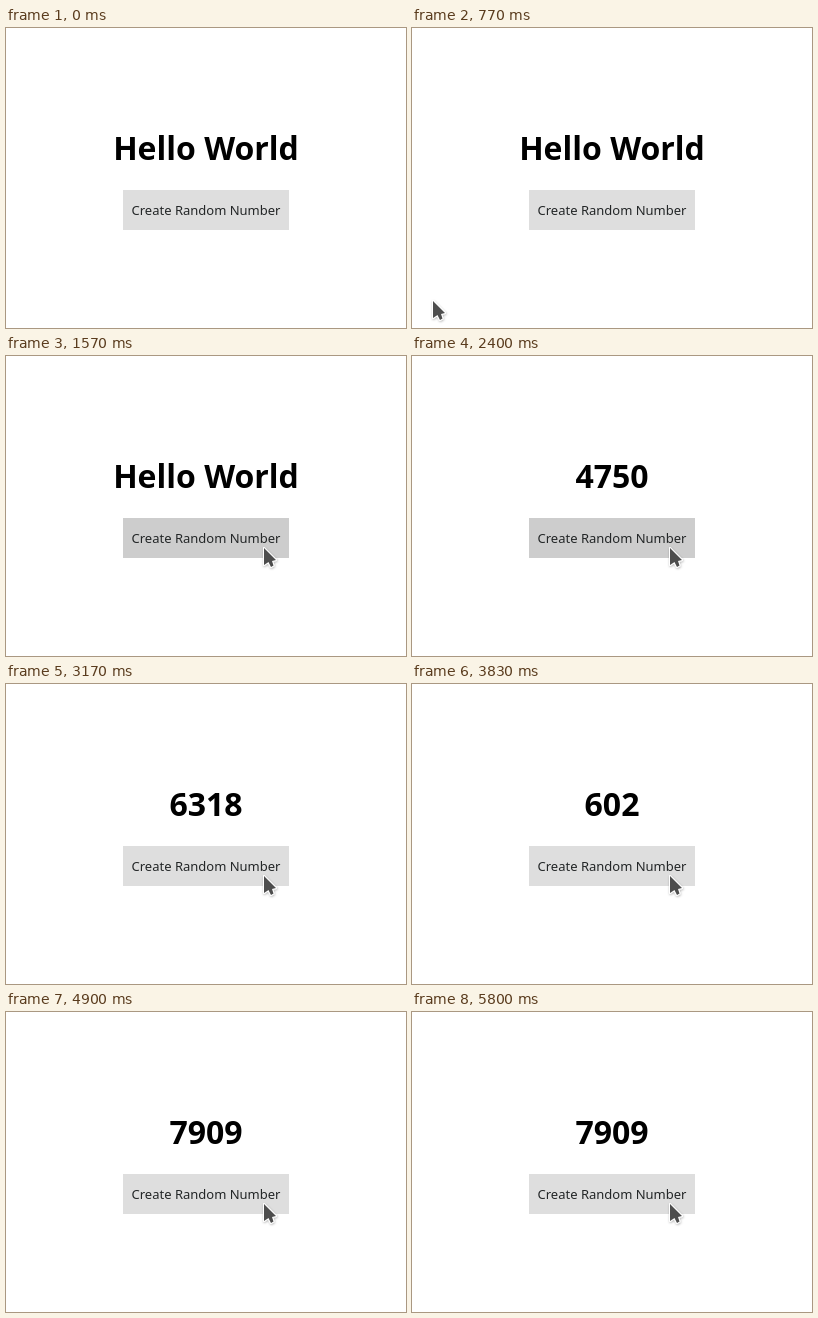
Write an HTML page that moves like this. It is 400 by 300 pixels and loops after 5930 ms.

```html
<!DOCTYPE html>
<html lang="en">
<head>
<meta charset="utf-8">
<title>Random number</title>
<style>
  html, body { margin: 0; width: 100%; height: 100%; overflow: hidden; background: #fff; }
  #stage { position: relative; width: 400px; height: 300px; overflow: hidden; font-family: "Noto Sans", "Open Sans", sans-serif; }
  #title, #button { position: absolute; text-align: center; white-space: nowrap; cursor: default; }
  #title { left: 0; top: 98px; width: 400px; font-size: 32px; font-weight: 700; line-height: 43px; color: #000; }
  #button { left: 117px; top: 162px; width: 166px; height: 29px; padding-top: 11px; font-size: 13px; line-height: 18px; color: #232627; }
  svg { position: absolute; left: 0; top: 0; }
</style>
</head>
<body>
<div id="stage">
  <div id="title">Hello World</div>
  <div id="button">Create Random Number</div>
  <svg width="400" height="300" viewBox="0 0 400 300">
    <defs>
      <filter id="shadow" x="-50%" y="-50%" width="200%" height="200%">
        <feDropShadow dx="0.5" dy="1" stdDeviation="0.8" flood-color="#000" flood-opacity="0.3"/>
      </filter>
    </defs>
    <g id="pointer" filter="url(#shadow)">
      <path d="M0 0V17L4.5 14L7 19L9.5 17.5L8 13L12 12Z" fill="#4d4d4d" stroke="#fff" stroke-width="2" stroke-linejoin="round" paint-order="stroke"/>
    </g>
  </svg>
</div>
<script>
const LOOP = 5930;
const PRESS = 100;
const title = document.getElementById('title');
const button = document.getElementById('button');
const pointer = document.getElementById('pointer');

// Press time and the number shown on release
const clicks = [[1570, '4750'], [2400, '6318'], [3700, '602'], [4730, '7909']];

// Pointer path: time, x, y
const path = [
  [30, -14, 232], [300, -4, 241], [600, 12, 256], [770, 21, 273],
  [870, 42, 280], [970, 150, 236], [1070, 300, 133], [1110, 311, 136],
  [1200, 277, 197], [1270, 262, 195], [1400, 258, 192]
];

const slope = (i, k) => (path[i + 1][k] - path[i][k]) / (path[i + 1][0] - path[i][0]);

// Harmonic mean of neighbouring slopes keeps the curve from overshooting
function tangent(i, k) {
  if (i === 0) return slope(0, k);
  if (i === path.length - 1) return 0;
  const a = slope(i - 1, k), b = slope(i, k);
  return a * b > 0 ? 2 * a * b / (a + b) : 0;
}

function along(t, k) {
  const last = path.length - 1;
  if (t <= path[0][0]) return path[0][k];
  if (t >= path[last][0]) return path[last][k];
  let i = 0;
  while (t >= path[i + 1][0]) i++;
  const span = path[i + 1][0] - path[i][0];
  const u = (t - path[i][0]) / span, v = 1 - u;
  return v * v * (1 + 2 * u) * path[i][k] + u * u * (3 - 2 * u) * path[i + 1][k]
    + span * u * v * (v * tangent(i, k) - u * tangent(i + 1, k));
}

function draw(t) {
  let text = 'Hello World', pressed = false;
  for (const [at, value] of clicks) {
    if (t >= at + PRESS) text = value;
    else if (t >= at) pressed = true;
  }
  if (title.textContent !== text) title.textContent = text;
  button.style.background = pressed ? '#cdcdcd' : '#dedede';
  const x = Math.round(along(t, 1)), y = Math.round(along(t, 2));
  pointer.setAttribute('transform', `translate(${x} ${y})`);
  pointer.style.display = t < path[0][0] ? 'none' : '';
}

const start = performance.now();
function tick() {
  draw((performance.now() - start) % LOOP);
  requestAnimationFrame(tick);
}
draw(0);
requestAnimationFrame(tick);
</script>
</body>
</html>
```
